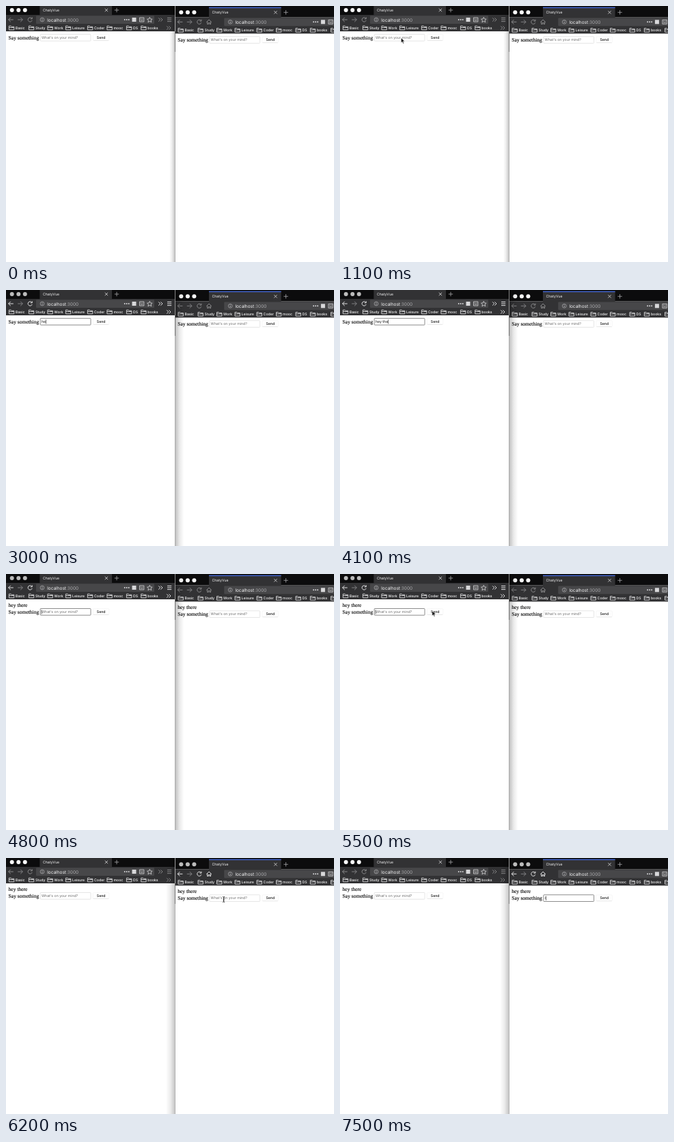
Write an HTML page that moves like this. It is 480 px wide and 374 px high and loops after 8 s.

```html
<!DOCTYPE html>
<html lang="en">
<head>
<meta charset="utf-8">
<title>ChatyVue</title>
<style>
  html, body { margin: 0; width: 100%; height: 100%; overflow: hidden; background: #fff; }
  svg { display: block; width: 480px; height: 374px; }
  text { font-family: Inter, "Open Sans", sans-serif; font-size: 5.2px; white-space: pre; text-rendering: geometricPrecision; }
  .page { font-family: "Liberation Serif", "Times New Roman", serif; font-size: 7.55px; stroke: #000; stroke-width: .12; }
  .url { font-size: 6.5px; }
  .bold { font-weight: 500; }
  .line { fill: none; stroke: #d8d8da; stroke-width: .8; }
  .nav { fill: none; stroke: #929294; stroke-width: .9; }
  .light { fill: #fafafa; }
  .active .light { fill: #bcbcbc; }
  .active .nav { stroke: #f4f4f5; }
  .nav.off, .active .nav.off { stroke: #8a8a8c; }
  .box { fill: #fff; stroke: #dcdcdc; stroke-width: .7; }
  .focus .box { stroke: #808080; stroke-width: .9; }
</style>
</head>
<body>
<svg id="stage" viewBox="0 0 480 374"></svg>
<script>
const LOOP = 8000, STEP = 100, MESSAGE = "hey there";
const stage = document.getElementById("stage");

const rect = (x, y, w, h, fill, extra = "") =>
  `<rect x="${x}" y="${y}" width="${w}" height="${h}" fill="${fill}" ${extra}/>`;
const path = (d, cls = "line", extra = "") => `<path d="${d}" class="${cls}" ${extra}/>`;
const dot = (x, y, r, fill) => `<circle cx="${x}" cy="${y}" r="${r}" fill="${fill}"/>`;
const label = (x, y, s, fill = "#f4f4f5", cls = "") =>
  `<text x="${x}" y="${y}" fill="${fill}" class="${cls}">${s}</text>`;
const chevrons = (x, y) =>
  path(`M${x - 2.8} ${y - 2.6}l2.6 2.6-2.6 2.6M${x + .4} ${y - 2.6}l2.6 2.6-2.6 2.6`, "nav");

const BOOKMARKS = [["Basic", 4], ["Study", 33], ["Work", 60.5], ["Leisure", 87],
  ["Coder", 119], ["mooc", 147.5], ["DS", 176], ["books", 197.3]];
const LIGHTS = [8.7, 18.3, 27.8];

const folder = x =>
  path(`M${x + .4} 29.2h2.8l1 1.1h3.6v4.5h-7.4zM${x + .4} 31.5h7.4`, "line", 'style="stroke:#d8d8da;stroke-width:.9"');

function addressBar({ urlX, urlW, dots }) {
  return rect(urlX, 14.3, urlW, 11.7, "#474749", 'rx="1.2"') +
    `<circle cx="${urlX + 9}" cy="20" r="2.9" class="line" style="stroke:#b4b4b6;stroke-width:.7"/>` +
    path(`M${urlX + 9} 19.5v2.2M${urlX + 9} 18v.8`, "line", 'style="stroke:#c8c8ca"') +
    label(urlX + 16.2, 22.5, 'localhost<tspan fill="#a4a4a6">:3000</tspan>', "#f4f4f5", "url") +
    [-3, 0, 3].map(d => dot(dots + d, 20, .95, "#dedee0")).join("") +
    rect(dots + 7.8, 17, 6, 6, "#d8d8da") +
    path(`M${dots + 18.8} 17h6.4v6h-6.4zM${dots + 20} 19h1.6M${dots + 22.6} 19h1.4M${dots + 20} 21h4`);
}

function chrome(o) {
  const top = -o.y;
  return rect(0, top, 247, 13 - top, "#0c0c0d") +
    rect(49.4, top + (o.accent ? 2 : 0), 105.6, 14 - top, "#323234") +
    (o.accent ? rect(49.4, top + 1.7, 105.6, 1.4, "#4468d8") : "") +
    LIGHTS.map(x => `<circle class="light" cx="${x}" cy="6" r="3"/>`).join("") +
    label(53.9, 8.2, "ChatyVue") +
    path("M144.7 3.8l4.4 4.4M149.1 3.8l-4.4 4.4") +
    path("M162 2.8v6.4M158.8 6h6.4", "line", 'style="stroke:#a8a8aa"') +
    rect(0, 13, 247, 24, "#323234") +
    path("M10.8 20H3.6M6.8 16.8L3.6 20l3.2 3.2", "nav") +
    path("M17.2 20h7.2M21.2 16.8l3.2 3.2-3.2 3.2", "nav off") +
    path("M37.8 18.2a3.1 3.1 0 1 0 .4 2.8M38.3 16.4v2.4h-2.4", "nav") +
    addressBar(o) + o.extras +
    BOOKMARKS.map(([s, x]) => folder(x) + label(x + 10, 34, s, "#fafafa", "bold")).join("");
}

function page() {
  return label(3.6, 48, "", "#000", "page msg") +
    `<g class="form">${label(3.6, 48.5, "Say something", "#000", "page")}
      ${rect(50.2, 41.4, 73.8, 9.7, "#fff", 'class="box" rx=".8"')}
      ${label(52, 48, "What's on your mind?", "#6c6c6c", "hint")}
      ${label(52, 48, "", "#111", "typed")}
      ${rect(52, 43.3, .6, 6.2, "#111", 'class="caret"')}
      ${rect(127.2, 41.6, 23.6, 8.6, "#fff", 'rx="1" stroke="#f0f0f0" stroke-width=".6"')}
      ${path("M127.8 50.4h22.4", "line", 'style="stroke:#dcdcdc;stroke-width:.6"')}
      ${label(132.8, 48, "Send", "#111", "bold")}</g>`;
}

const win = (id, o) =>
  `<g id="${id}" transform="translate(${o.x} ${o.y})">${rect(0, 0, 247, 374, "#fff")}${chrome(o)}${page()}</g>`;

const star = path("M210.3 16.4l1.1 2.5 2.7.3-2 1.8.6 2.7-2.4-1.4-2.4 1.4.6-2.7-2-1.8 2.7-.3z");
const menu = path("M236 17.4h6.2M236 20h6.2M236 22.6h6.2", "nav");
const home = path("M45.8 20.2l3.7-3.4 3.7 3.4M47 19.6v3.6h1.7v-2h1.7v2H52v-3.6", "nav");
const gradient = (id, a, b) =>
  `<linearGradient id="${id}"><stop offset="0" stop-opacity="${a}"/><stop offset=".5" stop-opacity="${(a + b) / 3}"/><stop offset="1" stop-opacity="${b}"/></linearGradient>`;

stage.innerHTML =
  `<defs>${gradient("toLeft", 0, .22)}${gradient("toRight", .26, 0)}</defs>` +
  win("left", { x: 0, y: 0, urlX: 44, urlW: 173, dots: 176.7,
    extras: star + menu + chevrons(226, 20) + chevrons(238, 32) }) +
  win("right", { x: 247.6, y: 3.3, accent: true, urlX: 71.6, urlW: 180, dots: 205.5,
    extras: home + folder(227.5) }) +
  rect(0, 0, 13, 374, "url(#toLeft)", 'id="shadeL"') +
  rect(247.4, 0, 13, 374, "url(#toRight)", 'id="shadeR"') +
  rect(247, 37, .8, 30, "#555") + rect(247, 67, .8, 307, "#a0a0a0") +
  path("M0 0V7.4L1.7 5.8 2.9 8.5 4.1 8 2.9 5.4H5.2Z", "", 'id="arrow" fill="#111" stroke="#fff" stroke-width=".5"') +
  path("M-1.6-4Q0-4 0-3V3Q0 4-1.6 4M1.6-4Q0-4 0-3V3Q0 4 1.6 4M-.9 .6H.9", "", 'id="beam" fill="none" stroke="#222" stroke-width=".8"');

const $ = id => document.getElementById(id);
const show = (el, on) => el.setAttribute("visibility", on ? "visible" : "hidden");
const move = (el, x, y) => el.setAttribute("transform", `translate(${x} ${y})`);
const panes = ["left", "right"].map(id => {
  const root = $(id), part = { root };
  for (const c of ["msg", "form", "hint", "typed", "caret"]) part[c] = root.querySelector("." + c);
  return part;
});

// Time at which each character of the message has been typed
const KEYS = [2800, 2900, 3200, 3600, 3700, 3900, 4100, 4200, 4400];
const SENT = 4800, LEFT_ON = 1500, RIGHT_ON = 6200;
const within = (t, a, b) => t >= a && t < b;

function drawPane(p, s) {
  p.root.classList.toggle("active", s.active);
  p.form.classList.toggle("focus", s.focus);
  p.msg.textContent = s.sent ? MESSAGE : "";
  move(p.form, 0, s.sent ? 9.1 : 0);
  p.typed.textContent = s.typed;
  show(p.hint, !s.typed);
  show(p.caret, s.caret);
  p.caret.setAttribute("x", 52 + (s.typed ? p.typed.getComputedTextLength() + .2 : -.2));
}

function pointer(t) {
  if (t < 100) return null;
  if (t < 200) return [77, 9];
  if (t < 300) return [222, 274];
  if (t < 5300) {
    const u = Math.min(1, Math.max(0, (t - 400) / 700)), e = 1 - (1 - u) ** 2;
    return [146 - 56.6 * e, 159 - 112.6 * e];
  }
  const u = Math.min(1, (t - 5300) / 700), e = u * u * (3 - 2 * u);
  return [89.4 + 229.2 * e, 46.4 + 13.4 * e + 8 * Math.sin(Math.PI * e)];
}

function draw(now) {
  const t = Math.floor((now % LOOP) / STEP) * STEP;
  const sent = t >= SENT;
  const leftActive = within(t, LEFT_ON, RIGHT_ON);
  const count = sent ? 0 : KEYS.filter(k => t >= k).length;

  drawPane(panes[0], {
    sent, typed: MESSAGE.slice(0, count),
    active: leftActive,
    focus: within(t, 2100, RIGHT_ON),
    caret: within(t, 2100, 2600) || within(t, 2800, 4900) || within(t, 5400, 5900)
  });
  drawPane(panes[1], {
    sent, typed: t >= 7500 ? "i" : "",
    active: t >= RIGHT_ON,
    focus: t >= 6800,
    caret: within(t, 6800, 7400) || t >= 7500
  });

  const depth = t < LEFT_ON ? 8 : 13;
  $("shadeL").setAttribute("width", depth);
  $("shadeL").setAttribute("x", 247 - depth);
  show($("shadeL"), !leftActive);
  show($("shadeR"), leftActive);

  const p = pointer(t);
  show($("beam"), within(t, LEFT_ON, 2800) || within(t, RIGHT_ON, 7500));
  show($("arrow"), p && (t < LEFT_ON || within(t, 5300, RIGHT_ON)));
  if (p) {
    move($("arrow"), ...p);
    move($("beam"), p[0], p[1] + .7);
  }
}

const start = performance.now();
function tick() {
  draw(performance.now() - start);
  requestAnimationFrame(tick);
}
tick();
</script>
</body>
</html>
```
